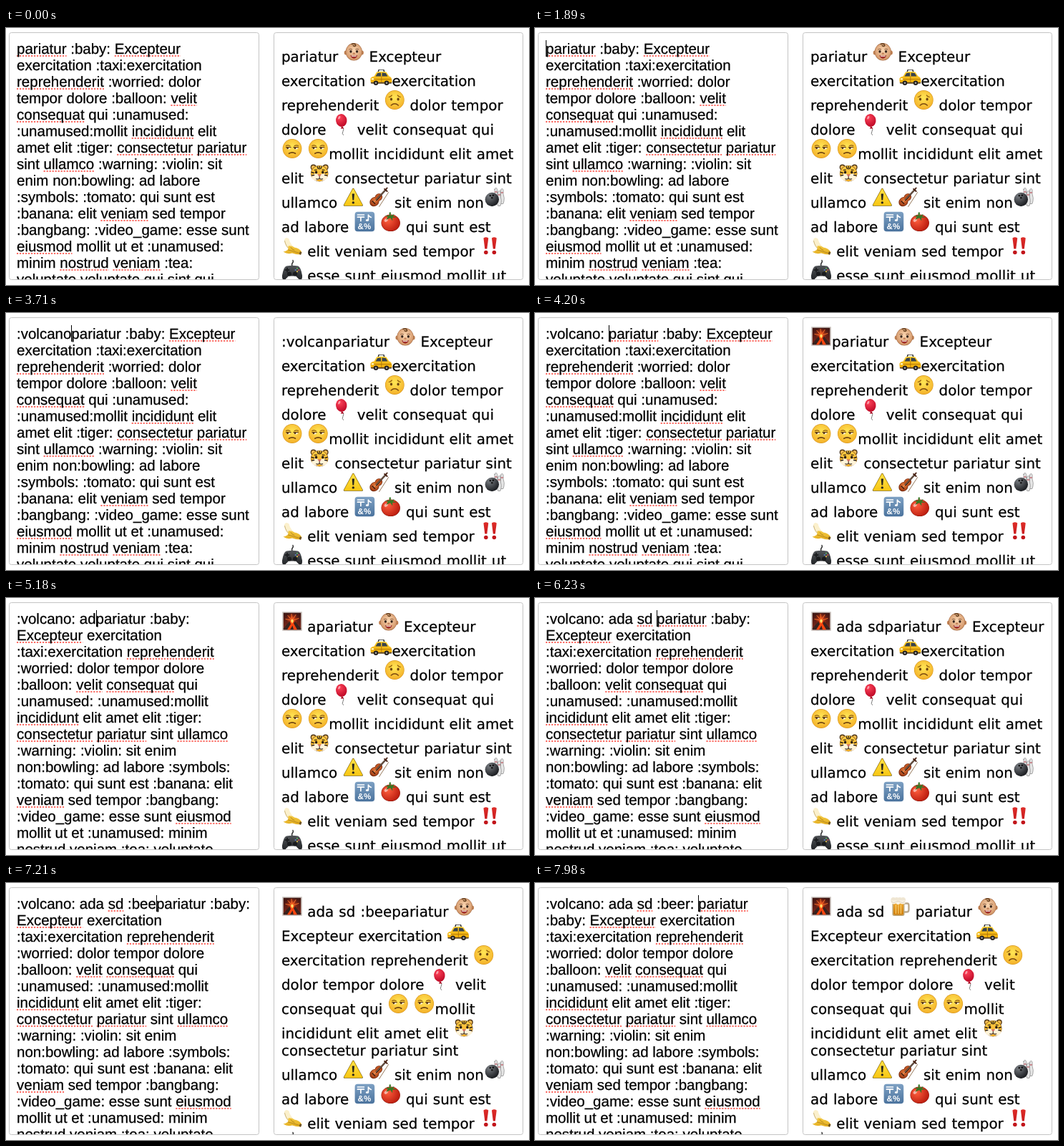
Write an HTML page with a canvas that moves like this. It is 731 by 359 pixels and loops after 8 s.

```html
<!DOCTYPE html>
<html lang="en">
<head>
<meta charset="utf-8">
<title>Emoji preview</title>
<style>
  html, body { margin: 0; width: 100%; height: 100%; overflow: hidden; background: #fff; }
  canvas { display: block; }
</style>
</head>
<body>
<canvas id="stage" width="731" height="359"></canvas>
<script>
const ctx = document.getElementById('stage').getContext('2d');
const LOOP = 8000;
const ICON = 30;
const EDITOR_FONT = '20.5px "Liberation Sans", Arial, sans-serif';
const PREVIEW_FONT = '19.88px "DejaVu Sans", Verdana, sans-serif';

// Each key: time, character, delay until the preview follows.
const KEYS = [
  [2030, ':'], [2310, 'v'], [2380, 'o', 0], [2520, 'l'], [2870, 'c'],
  [3430, 'a'], [3500, 'n'], [3710, 'o'], [4060, ':'], [4200, ' '],
  [5110, 'a'], [5180, 'd'], [5320, 'a'], [5390, ' '],
  [6090, 's'], [6160, 'd'], [6230, ' '], [6300, ':'],
  [6720, 'b'], [6860, 'e'], [7070, 'e', 140], [7280, 'r'],
  [7630, ':', 0], [7840, ' ', 140]
];

const EDITOR_START = `pariatur :baby: Excepteur
exercitation :taxi:exercitation
reprehenderit :worried: dolor
tempor dolore :balloon: velit
consequat qui :unamused:
:unamused:mollit incididunt elit
amet elit :tiger: consectetur pariatur
sint ullamco :warning: :violin: sit
enim non:bowling: ad labore
:symbols: :tomato: qui sunt est
:banana: elit veniam sed tempor
:bangbang: :video_game: esse sunt
eiusmod mollit ut et :unamused:
minim nostrud veniam :tea:
voluptate voluptate qui sint qui`;

const EDITOR_WRAPPED = `pariatur :baby:
Excepteur exercitation
:taxi:exercitation reprehenderit
:worried: dolor tempor dolore
:balloon: velit consequat qui
:unamused: :unamused:mollit
incididunt elit amet elit :tiger:
consectetur pariatur sint ullamco
:warning: :violin: sit enim
non:bowling: ad labore :symbols:
:tomato: qui sunt est :banana: elit
veniam sed tempor :bangbang:
:video_game: esse sunt eiusmod
mollit ut et :unamused: minim
nostrud veniam :tea: voluptate`;

const PREVIEW_START = `pariatur :baby: Excepteur
exercitation :taxi:exercitation
reprehenderit :worried: dolor tempor
dolore :balloon: velit consequat qui
:unamused: :unamused:mollit incididunt elit amet
elit :tiger: consectetur pariatur sint
ullamco :warning: :violin: sit enim non:bowling:
ad labore :symbols: :tomato: qui sunt est
:banana: elit veniam sed tempor :bangbang:
:video_game: esse sunt eiusmod mollit ut`;

const PREVIEW_WRAPPED = `pariatur :baby:
Excepteur exercitation :taxi:
exercitation reprehenderit :worried:
dolor tempor dolore :balloon: velit
consequat qui :unamused: :unamused:mollit
incididunt elit amet elit :tiger:
consectetur pariatur sint
ullamco :warning: :violin: sit enim non:bowling:
ad labore :symbols: :tomato: qui sunt est
:banana: elit veniam sed tempor :bangbang:
:video_game: esse sunt eiusmod mollit ut`;

const MISSPELLED = new Set(('pariatur Excepteur reprehenderit velit consequat incididunt ' +
  'consectetur ullamco veniam eiusmod nostrud voluptate sd').split(' '));

function oval(x, y, rx, ry, fill, turn = 0) {
  ctx.beginPath();
  ctx.ellipse(x, y, rx, ry, turn, 0, 7);
  ctx.fillStyle = fill;
  ctx.fill();
}
function shape(path, fill) {
  ctx.fillStyle = fill;
  ctx.fill(new Path2D(path));
}
function line(path, color, width = 1.2) {
  ctx.strokeStyle = color;
  ctx.lineWidth = width;
  ctx.lineCap = ctx.lineJoin = 'round';
  ctx.stroke(new Path2D(path));
}
function fade(top, bottom) {
  const g = ctx.createLinearGradient(0, 2, 0, 28);
  g.addColorStop(0, top);
  g.addColorStop(1, bottom);
  return g;
}
function glow(x, y, r, inner, outer) {
  const g = ctx.createRadialGradient(x, y, 1, x, y, r);
  g.addColorStop(0, inner);
  g.addColorStop(1, outer);
  return g;
}
function yellowFace() {
  oval(15, 15, 13.4, 13.4, '#d99a20');
  oval(15, 15, 12.8, 12.8, glow(15, 12, 17, '#ffe352', '#f3ad27'));
}

// Icons are drawn in a 30 by 30 box.
const ICONS = {
  baby() {
    oval(3.6, 17, 2.2, 3, '#c08052');
    oval(26.4, 17, 2.2, 3, '#c08052');
    oval(15, 15.8, 11.6, 12.2, '#9f6640');
    oval(15, 15.8, 11, 11.6, glow(15, 14, 14, '#f8d3ae', '#cf9061'));
    line('M12 5Q17 3.5 17.5 7Q16 9 14 7', '#65401f', 1.6);
    line('M8.5 12.3Q10.5 11 12.5 12.3M17.5 12.3Q19.5 11 21.5 12.3', '#85573a', 1);
    oval(10.7, 15.3, 1.6, 1.9, '#33231b');
    oval(19.3, 15.3, 1.6, 1.9, '#33231b');
    oval(15, 18.2, 1.8, 1.1, '#c07c55');
    shape('M10 20.6Q15 22 20 20.6Q18.5 25.2 15 25.2Q11.5 25.2 10 20.6Z', '#a02d29');
    shape('M11.5 21Q15 21.9 18.5 21L18 22.3H12Z', '#fff');
  },
  taxi() {
    shape('M11 6.5H19L20 10H10Z', '#2a2a2a');
    shape('M12.3 7.3H17.8L18.3 9.5H11.5Z', '#fff');
    shape('M0 19Q1 16.5 5 16L8.5 10Q15 8.7 22 10L26 16Q30 17 30 23Q30 26 27 26H3Q0 26 0 22Z', fade('#ffdb3e', '#eda500'));
    shape('M7 16L9.8 11.4Q12.5 11 14.5 11V16ZM16 11Q19 11 21.3 11.5L24 16H16Z', '#38424b');
    line('M1.5 20H28.5M15.3 16V25', '#a66c06', .8);
    oval(3, 19.8, 1.7, 1.3, '#fff6c4');
    line('M1 25.2H29', '#46362a', 1.5);
    for (const x of [7.5, 22.5]) {
      oval(x, 25.3, 3.2, 3.2, '#25211e');
      oval(x, 25.3, 1.3, 1.3, '#aaa');
    }
  },
  worried() {
    yellowFace();
    line('M7 11Q9.5 10.3 11 8.5M23 11Q20.5 10.3 19 8.5', '#93600e', 1.2);
    oval(10.2, 14, 1.6, 2, '#69420f');
    oval(19.8, 14, 1.6, 2, '#69420f');
    line('M10 22.5Q15 18 20 22.5', '#7b4a10', 1.6);
  },
  balloon() {
    line('M16 19Q18.5 22 16.5 25T17 30', '#777', 1);
    shape('M15.2 17.5L13.3 21H18Z', '#a90b22');
    oval(14.3, 9.5, 7.7, 8.9, glow(12, 6, 12, '#f83e55', '#c10b29'), -.15);
    oval(11.3, 5.7, 1.3, 2.5, 'rgba(255,255,255,.5)', .5);
  },
  unamused() {
    yellowFace();
    line('M6.5 11Q9 9.7 12 11.2M18 11.2Q21 9.7 23.5 11', '#8e5b10', 1.2);
    for (const x of [9.8, 20.2]) {
      shape(`M${x - 3.2} 13.2H${x + 3.2}Q${x + 2.7} 16 ${x} 16T${x - 3.2} 13.2Z`, '#fff5d9');
      oval(x - 1.2, 14.3, 1.4, 1.4, '#4a2c12');
      line(`M${x - 3.3} 13.2H${x + 3.3}`, '#6b4210', 1.2);
    }
    line('M10.5 21.8Q15 19 19.5 21.8', '#6f430f', 1.6);
  },
  tiger() {
    for (const x of [6.5, 23.5]) {
      oval(x, 7, 4, 4, '#4b3315');
      oval(x, 7.3, 2.7, 2.7, '#f5bd54');
    }
    oval(15, 15.7, 12.2, 11.2, '#80530f');
    oval(15, 15.7, 11.7, 10.7, fade('#ffd14b', '#f5ad22'));
    oval(10, 20.8, 5.8, 4.7, '#fff3d8');
    oval(20, 20.8, 5.8, 4.7, '#fff3d8');
    line('M15 6V9.5M12 6.2L13.2 9M18 6.2L16.8 9M4 14L7 15M26 14L23 15M4.5 18.5L7.5 18M25.5 18.5L22.5 18', '#2c2117', 1.4);
    line('M8 11L11 10.6M22 11L19 10.6', '#2c2117', 1.2);
    oval(10.4, 14, 1.7, 2, '#231a13');
    oval(19.6, 14, 1.7, 2, '#231a13');
    shape('M12 17H18L15 20.3Z', '#d0695c');
    line('M15 20V22.3Q13 24.5 10.5 23.2M15 22.3Q17 24.5 19.5 23.2', '#38271a', 1.1);
  },
  warning() {
    line('M15 3.5L27.3 26H2.7Z', '#66551e', 2.6);
    line('M15 3.7L27 25.8H3Z', '#f3c414', 1.8);
    shape('M15 3.5L27 26H3Z', fade('#ffe650', '#f7c40f'));
    shape('M13.3 10H16.7L15.9 19H14.1Z', '#29251c');
    oval(15, 22.4, 1.7, 1.7, '#29251c');
  },
  violin() {
    line('M15 28L28 8', '#96795b', 1);
    oval(8.3, 21.2, 7, 6.2, '#742a0e', -.8);
    oval(14.2, 15, 5.6, 5, '#742a0e', -.8);
    oval(8.4, 20.9, 6.2, 5.4, glow(9, 19, 8, '#dc7134', '#a33c14'), -.8);
    oval(14.1, 14.9, 4.9, 4.3, '#bf5522', -.8);
    line('M11 18.5L24 4.5', '#33201a', 2.4);
    line('M6.5 22.5L24 4.5', '#e9c79a', .6);
    line('M22.5 3.5L26 6.5M24 4.5L26 2', '#4a2415', 2);
    line('M5.5 20.5L9 24', '#3d1c10', 1.5);
  },
  bowling() {
    for (const [x, y] of [[17, 2], [25.5, 3], [21.5, 6]]) {
      const pin = `M${x - 1.8} ${y + 2}Q${x} ${y - 2.5} ${x + 1.8} ${y + 2}Q${x + 1} ${y + 7} ${x + 3} ${y + 13}Q${x + 3} ${y + 18} ${x + 1.6} ${y + 21}H${x - 1.6}Q${x - 3.4} ${y + 17} ${x - 2.8} ${y + 13}Q${x - 1} ${y + 7} ${x - 1.8} ${y + 2}Z`;
      shape(pin, '#e6e6e6');
      line(pin, '#858585', .7);
      line(`M${x - 1.2} ${y + 5.5}H${x + 1.2}`, '#b93440', 1);
    }
    oval(11.5, 18, 9.7, 9.7, glow(8, 13, 14, '#73777c', '#202226'));
    oval(9, 12.7, 1.3, 1.2, '#111');
    oval(13, 12.2, 1.3, 1.2, '#111');
    oval(11.5, 15.7, 1.3, 1.2, '#111');
  },
  symbols() {
    ctx.beginPath();
    ctx.roundRect(1.2, 1.2, 27.6, 27.6, 4);
    ctx.fillStyle = fade('#7c9fc2', '#4d759f');
    ctx.fill();
    line('M5 5.5H14M5 8.7H14M9.5 8.7V14', '#fff', 1.7);
    line('M20 13V5.5Q21 8 24 9', '#fff', 1.6);
    oval(18.5, 13, 2, 1.6, '#fff');
    ctx.fillStyle = '#fff';
    ctx.font = 'bold 11.5px "Liberation Sans", sans-serif';
    ctx.fillText('&%', 5.2, 25.5);
  },
  tomato() {
    oval(15, 16.8, 13.2, 11.8, '#8e170b');
    oval(15, 16.8, 12.7, 11.3, glow(11, 13, 18, '#fa5a3b', '#b91a0d'));
    oval(8.5, 13, 2.8, 2, 'rgba(255,255,255,.55)', -.6);
    shape('M15 6.5L20 4.5L18.3 7.5L24 9.5L17.5 9.3L17.5 14L14.5 9.7L8.5 12.5L11 8.4L7 6.8L12.8 6.5L13 2L15.2 2Z', '#387725');
  },
  banana() {
    shape('M4 6Q6 1.5 10.5 5Q12 12 18 17L13 22Q4 16 4 6Z', '#fbf0cc');
    line('M4.5 8Q6 16 13 21', '#cdb57b', 1);
    shape('M9.5 15Q14 14 18 17Q25 18 28 23L26.5 27Q20 27 15 25Q8 27 2.5 23Q8 22 9.5 19Z', fade('#ffe05e', '#e4ad1f'));
    line('M9.5 20.5Q15 22 25.5 25M13 17Q14 19.5 18 21', '#a97b18', .8);
    shape('M26 22.5L28.5 24L27 27.5L24.7 26Z', '#705323');
  },
  bangbang() {
    for (const x of [9, 20.5]) {
      shape(`M${x - 3.4} 4Q${x} 1.5 ${x + 3.4} 4L${x + 1.5} 19H${x - 1.5}Z`, fade('#df2e29', '#bf1118'));
      oval(x, 24, 2.8, 2.8, '#c2151b');
    }
  },
  video_game() {
    line('M15 10Q14 6 15.5 4.5T16 1', '#333', 1.5);
    shape('M7 9Q15 7.5 23 9Q27 10 29 22Q29.5 29 25.5 28.5L20 23H10L4.5 28.5Q.5 29 1 22Q3 10 7 9Z', fade('#606468', '#222427'));
    oval(11, 20, 3, 3, '#191b1d');
    oval(19, 20, 3, 3, '#191b1d');
    line('M5.5 14.5H10.5M8 12V17', '#1b1d1f', 1.8);
    oval(22, 12.3, 1.1, 1.1, '#5bad62');
    oval(24.3, 14.5, 1.1, 1.1, '#d65450');
    oval(19.7, 14.5, 1.1, 1.1, '#5781c6');
    oval(22, 16.7, 1.1, 1.1, '#d8b748');
  },
  volcano() {
    shape('M1.2 1.8H28.8V28.2H1.2Z', '#c9c2bd');
    shape('M2.8 3.2H27.2V26.8H2.8Z', fade('#3a1512', '#86291a'));
    oval(15, 11, 10, 7.5, glow(15, 12, 10, '#f3521c', 'rgba(130,25,12,0)'));
    line('M15 14L14 5M15 14L9 7M15 14L20 6M15 14L24 11M15 14L6 12', '#f7712a', 1);
    shape('M2.8 25L11.5 15H18.5L27.2 25V26.8H2.8Z', '#38221e');
    shape('M11.5 15Q15 11 18.5 15L17 18L22 26.8H17L15.5 21L12 26.8H8L13 19Z', '#f8450f');
    shape('M13 14.5Q15 10 17 14.5L15 18Z', '#ffe06a');
  },
  beer() {
    line('M20 11H25Q27 11 27 14V20Q27 23 24 23H20', '#b9a88d', 2.4);
    shape('M4 8H21V26Q21 28.5 18 28.5H7Q4 28.5 4 26Z', '#bda678');
    shape('M5.5 9H19.5V25Q19.5 27 18 27H7Q5.5 27 5.5 25Z', fade('#fabb40', '#cf7d0c'));
    line('M9 13V25M12.5 13V25M16 13V25', '#f7cf72', 1.1);
    for (const x of [5.5, 10, 14.5, 19]) oval(x, 6.5, 3.6, 4, '#efe6d3');
    shape('M3 7H22V11Q18 13 15 11Q12 14 9 11Q6 13 3 11Z', '#faf4e6');
    line('M3 9Q6 11 9 9T15 9T21 9', '#cfc1a6', .7);
  }
};

function typedAt(t, lagged) {
  return KEYS.filter(([time, , lag = 70]) => time + (lagged ? lag : 0) <= t)
    .map(key => key[1]).join('');
}

function caretVisible(t) {
  return (t >= 910 && t < 1400) || (t >= 1890 && t < 4830) || t >= 5110;
}

function setFont(font, wordSpacing) {
  ctx.font = font;
  ctx.wordSpacing = wordSpacing;
  ctx.textRendering = 'geometricPrecision';
  ctx.fillStyle = ctx.strokeStyle = '#000';
  ctx.lineWidth = .25;
}

// A hairline outline gives the text its slightly heavy smoothing.
function drawText(text, x, y) {
  ctx.fillText(text, x, y);
  ctx.strokeText(text, x, y);
}

function editorLines(typed) {
  if (typed.includes(':beer')) return EDITOR_WRAPPED.replace(' :baby:\n', '\n:baby: ').split('\n');
  return (typed.length > 10 ? EDITOR_WRAPPED : EDITOR_START).split('\n');
}

function underline(x, y, width) {
  ctx.save();
  ctx.setLineDash([2.2, 1.8]);
  ctx.strokeStyle = 'rgba(250,60,50,.75)';
  ctx.lineWidth = 2;
  ctx.beginPath();
  ctx.moveTo(x, y);
  ctx.lineTo(x + width, y);
  ctx.stroke();
  ctx.restore();
}

function drawEditor(t) {
  const typed = typedAt(t, false);
  const lines = editorLines(typed);
  lines[0] = typed + lines[0];
  setFont(EDITOR_FONT, '0px');
  const widthOf = text => ctx.measureText(text).width;
  lines.forEach((text, i) => {
    const y = 36 + 23 * i;
    for (const { 0: word, index } of text.matchAll(/\w+/g)) {
      if (MISSPELLED.has(word)) underline(15 + widthOf(text.slice(0, index)), y + 3, widthOf(word));
    }
    drawText(text, 15, y);
  });
  if (caretVisible(t)) ctx.fillRect(Math.round(15 + widthOf(typed)), 17, 1, 23);
}

function drawIcon(name, x, baseline) {
  ctx.save();
  ctx.translate(x, baseline - ICON + .5);
  ICONS[name]();
  ctx.restore();
}

function drawPreview(t) {
  const typed = typedAt(t, true);
  const lines = (typed.includes('sd ') ? PREVIEW_WRAPPED : PREVIEW_START).split('\n');
  lines[0] = typed + lines[0];
  setFont(PREVIEW_FONT, '0.8px');
  let y = 13;
  for (const text of lines) {
    const parts = text.split(/(:\w+:)/);
    y += parts.length > 1 ? 34 : 24;
    let x = 385;
    for (const part of parts) {
      const name = part.slice(1, -1);
      if (part.startsWith(':') && part.endsWith(':') && ICONS[name]) {
        drawIcon(name, x, y);
        x += ICON;
      } else {
        drawText(part, x, y);
        x += ctx.measureText(part).width;
      }
    }
  }
}

function drawPanel(x, width, content, t) {
  const frame = new Path2D();
  frame.roundRect(x, 6.5, width, 345, 3);
  ctx.save();
  ctx.clip(frame);
  content(t);
  ctx.restore();
  ctx.strokeStyle = '#c4c4c4';
  ctx.lineWidth = 1;
  ctx.stroke(frame);
}

function draw(now) {
  const t = now % LOOP;
  ctx.fillStyle = '#fff';
  ctx.fillRect(0, 0, 731, 359);
  drawPanel(4.5, 349, drawEditor, t);
  drawPanel(374.5, 348, drawPreview, t);
  requestAnimationFrame(draw);
}
requestAnimationFrame(draw);
</script>
</body>
</html>
```
